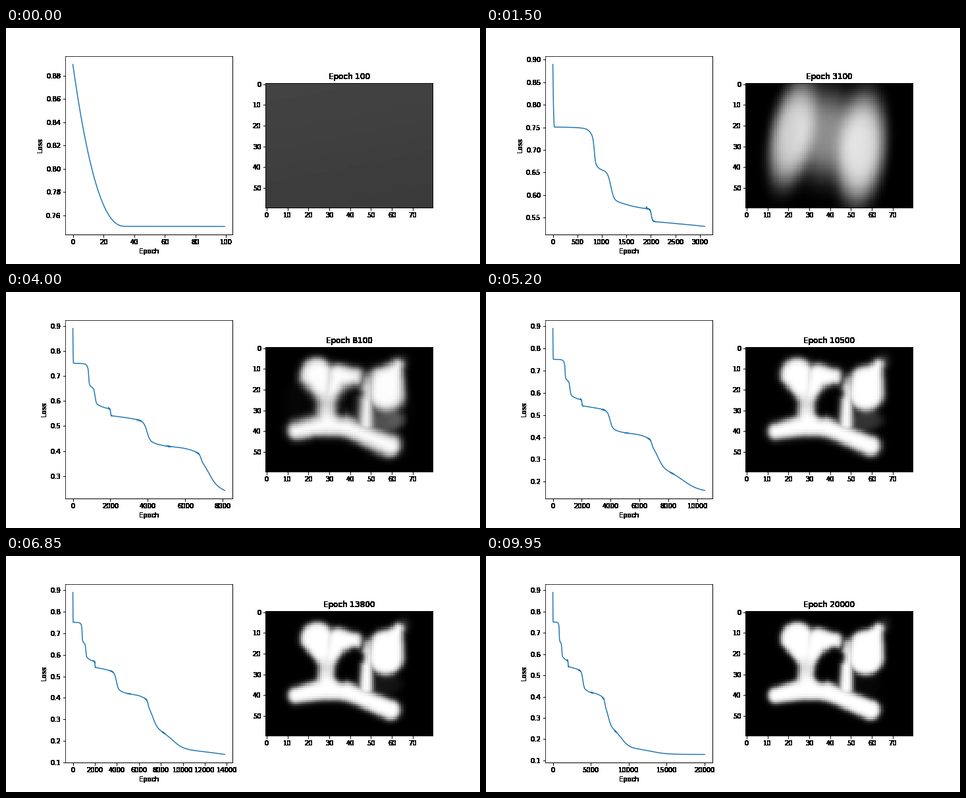
Recreate the animation shown at these times as a matplotlib script. Size 720x360 px, loop 10000 ms.

```python
import numpy as np
import matplotlib.pyplot as plt
from matplotlib.animation import FuncAnimation

FRAMES, STEP = 200, 100
COLS, ROWS = 80, 60
CELL, LEFT, TOP = 3.17, 394.4, 84.0

plt.rcParams.update({
    "figure.dpi": 72,
    "font.family": "DejaVu Sans",
    "font.size": 10,
    "figure.subplot.bottom": 0.125,
    "text.kerning_factor": 6,
})


def sigmoid(z):
    return 1 / (1 + np.exp(-np.clip(z, -60, 60)))


# The loss falls in logistic steps: (centre, width, size)
DROPS = [
    (600, 150, .003), (830, 50, .040), (845, 12, .050),
    (1182, 32, .062), (1400, 200, .026), (2012, 12, .027),
    (2500, 350, .010), (3955, 80, .070), (4050, 400, .046),
    (6300, 350, .020), (6840, 35, .022), (7250, 230, .118),
    (9000, 550, .100), (13000, 1000, .028),
]

epochs = np.arange(FRAMES * STEP)
clean = .7507 + .139 * np.clip(1 - epochs / 34, 0, 1) ** 2.28
for centre, width, size in DROPS:
    clean -= size * sigmoid((epochs - centre) / width)

# A spike and a few jittery stretches
noise = np.random.default_rng(4).normal(size=epochs.size)
jitter = np.clip(np.sin(epochs / 250), 0, 1) ** 8
jitter[(epochs < 1900) | (epochs > 8500)] = 0
loss = (clean + .0003 * noise * jitter
        + .004 * np.exp(-((epochs - 1912) / 5) ** 2))


# Network output, laid out in stage pixels
X, Y = np.meshgrid(LEFT + (np.arange(COLS) + .5) * CELL,
                   TOP + (np.arange(ROWS) + .5) * CELL)


def blob(cx, cy, sx, sy, power=2, lean=0):
    dx = X - cx + lean * (Y - cy)
    return np.exp(-np.hypot(dx / sx, (Y - cy) / sy) ** power)


def union(*parts):
    rest = 1.0
    for part in parts:
        rest = rest * (1 - part)
    return 1 - rest


def limb(x1, y1, r1, x2, y2, r2):
    """Signed distance to a tapered capsule."""
    dx, dy = x2 - x1, y2 - y1
    t = np.clip(((X - x1) * dx + (Y - y1) * dy) / (dx * dx + dy * dy), 0, 1)
    return np.hypot(X - x1 - t * dx, Y - y1 - t * dy) - r1 - t * (r2 - r1)


def join(limbs, blend=2):
    """Signed distance to all limbs together, with rounded joints."""
    return -blend * np.log(sum(np.exp(-limb(*p) / blend) for p in limbs))


BOW = [
    (470, 119, 20, 459, 165, 31), (459, 165, 31, 447, 206, 21),
    (490, 166, 54, 550, 168, 55), (588, 116, 15, 579, 180, 34),
    (579, 180, 34, 573, 229, 27), (530, 180, 45, 573, 229, 27),
]
BODY = [
    (473, 127, 25, 487, 165, 10), (505, 129, 17, 488, 165, 10),
    (487, 165, 10, 487, 200, 15), (505, 129, 17, 530, 130, 12),
    (577, 140, 26, 577, 155, 27), (580, 140, 24, 596, 112, 8),
    (550, 135, 7, 547, 202, 10), (441, 213, 12, 495, 201, 17),
    (495, 202, 17, 520, 208, 13), (520, 208, 13, 584, 235, 15),
]


def bow():
    dips = (.26 * blob(461, 166, 20, 32, lean=.15)
            + .25 * blob(571, 189, 21, 36, lean=.1)
            + .13 * blob(517, 168, 60, 45, 3))
    return .82 * sigmoid(-join(BOW) / 3.2) * (1 - dips)


def body(hole_size, blur, notch, seam):
    hole = limb(530, 155, 15 * hole_size, 512, 180, 14 * hole_size)
    shape = sigmoid(-np.maximum(join(BODY), -hole) / blur)
    shape = shape * (1 - .12 * blob(486, 171, 9, 14))
    shape = shape * (1 - seam * blob(546, 130, 9, 13))
    return union(shape, notch * blob(580, 196, 24, 15, 4),
                 .1 * blob(606, 104, 10, 12))


lobes = union(.79 * blob(466, 162, 33, 78, 4, .17),
              .86 * blob(570, 184, 36, 82, 4, .08),
              .55 * blob(517, 163, 50, 66, 3))
STAGES = [
    (99, .268 - .0005 * (Y - TOP) / CELL - .0001 * (X - LEFT) / CELL),
    (920, .58 * blob(517, 168, 84, 84, 2.4)),
    (1400, .70 * blob(517, 168, 90, 82, 3.2)),
    (3099, lobes),
    (5999, bow()),
    (10499, body(.92, 2.8, .2, .4)),
    (13799, body(.98, 2.5, .08, .3)),
    (19999, body(1, 2.3, .03, .25)),
]


def logit(p):
    p = np.clip(p, .003, .997)
    return np.log(p / (1 - p))


marks = [epoch for epoch, _ in STAGES]
fields = [logit(image) for _, image in STAGES]


def output(epoch):
    """Blend neighbouring stages in step with the falling loss."""
    i = int(np.clip(np.searchsorted(marks, epoch, side="right") - 1,
                    0, len(marks) - 2))
    start, end = clean[marks[i]], clean[marks[i + 1]]
    w = np.clip((start - clean[epoch]) / (start - end), 0, 1)
    p = sigmoid((1 - w) * fields[i] + w * fields[i + 1])
    return np.clip((p - .003) / .994, 0, 1)


def harden(img, dpi):
    """Turn soft edges into solid black pixels."""
    solid = np.zeros_like(img)
    solid[..., 3] = img[..., 3] > 0
    return solid, 0, 0


fig, (plot, view) = plt.subplots(1, 2, figsize=(10, 5), facecolor="white")
line, = plot.plot([], [], color="#1f77b4", lw=1.5)
plot.set_xlabel("Epoch")
plot.set_ylabel("Loss")
picture = view.imshow(output(99), cmap="gray", vmin=0, vmax=1,
                      interpolation="nearest")
title = view.set_title("")
for ax in (plot, view):
    ax.spines[["bottom", "right"]].set_linewidth(1)
    ax.xaxis.set_agg_filter(harden)
    ax.yaxis.set_agg_filter(harden)
title.set_agg_filter(harden)


def draw(frame):
    n = (frame + 1) * STEP
    line.set_data(epochs[:n], loss[:n])
    plot.relim()
    plot.autoscale_view()
    picture.set_data(output(n - 1))
    title.set_text(f"Epoch {n}")
    return line, picture, title


anim = FuncAnimation(fig, draw, frames=FRAMES, interval=50,
                     init_func=lambda: draw(0), repeat=True, repeat_delay=0)
plt.show()
```
